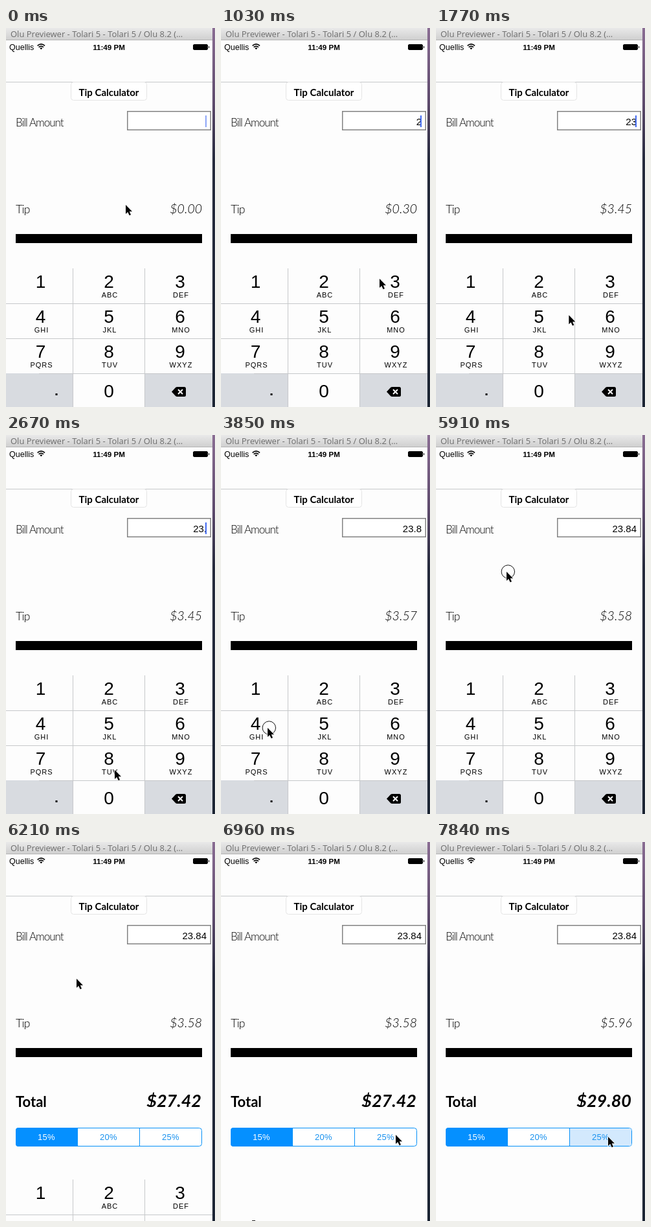
Write an HTML page that moves like this. It is 323 by 585 pixels and loops after 7990 ms.

```html
<!DOCTYPE html>
<html lang="en">
<head>
<meta charset="utf-8">
<title>Tip Calculator</title>
<style>
  html, body { margin: 0; width: 100%; height: 100%; overflow: hidden; background: #fdfdfd; }
  svg { display: block; }
  text { font-family: "Liberation Sans", Arial, sans-serif; }
  .hand { font-family: Lato, sans-serif; font-weight: 300; }
  .bold { font-weight: 700; }
  .end { text-anchor: end; }
  .mid { text-anchor: middle; }
  .line { stroke: #c6c8ca; }
</style>
</head>
<body>
<svg id="stage" width="323" height="585">
  <defs>
    <linearGradient id="bar" x2="0" y2="1">
      <stop stop-color="#e9e9e9"/><stop offset="1" stop-color="#d0d0d0"/>
    </linearGradient>
    <linearGradient id="desk" x2="0" y2="1">
      <stop stop-color="#8a6d93"/><stop offset=".2" stop-color="#5d4a6c"/>
      <stop offset=".35" stop-color="#252a3c"/><stop offset="1" stop-color="#1c2534"/>
    </linearGradient>
  </defs>

  <rect width="323" height="585" fill="#fdfdfd"/>
  <rect x="319" width="4" height="585" fill="url(#desk)"/>
  <rect width="319" height="18" fill="url(#bar)"/>
  <path d="M0 18.5H319" stroke="#b4b4b4"/>
  <text x="7" y="13.5" font-size="13" fill="#6c6c6c" style="font-family:'Open Sans',sans-serif">Olu Previewer - Tolari 5 - Tolari 5 / Olu 8.2 (…</text>

  <text x="5" y="34" font-size="12.5">Quellis</text>
  <g fill="none" stroke="#000" stroke-width="1.7">
    <path d="M48.6 27.3Q54.3 22.4 60 27.3M50.6 29.6Q54.3 26.5 58 29.6"/>
    <path d="M52.2 30.9L54.3 33.2 56.4 30.9Q54.3 29.5 52.2 30.9Z" fill="#000" stroke="none"/>
  </g>
  <text class="mid bold" x="159" y="33.5" font-size="11.6">11:49 PM</text>
  <rect x="289.5" y="25.5" width="22" height="8" rx="1.5" stroke="#000"/>
  <path d="M313 27.5Q315.5 29.5 313 31.5Z"/>

  <path class="line" d="M0 83.5H319"/>
  <rect x="100.5" y="83.5" width="117" height="28" rx="4" fill="#fff" stroke="#e4e4e4"/>
  <text class="hand bold mid" x="159" y="104.5" font-size="15">Tip Calculator</text>

  <text class="hand" x="15" y="152" font-size="17" letter-spacing="-1">Bill Amount</text>
  <rect x="187.75" y="128.75" width="128.5" height="28.5" fill="#fff" stroke="#828282" stroke-width="1.5"/>
  <text id="bill" class="end" x="310" y="150" font-size="15"></text>
  <rect id="caret" x="308" y="135" width="2" height="18" fill="#426bf2"/>

  <svg width="319" height="289">
    <text class="hand" x="15" y="286" font-size="18" letter-spacing="-1">Tip</text>
    <text id="tip" class="hand end" x="303" y="286" font-size="19.5" font-style="italic"></text>
  </svg>
  <rect x="15" y="318" width="288" height="14"/>
  <svg width="319" height="409">
    <text class="hand bold" x="15" y="409" font-size="22">Total</text>
    <text id="total" class="hand bold end" x="302" y="409" font-size="27" font-style="italic"></text>
  </svg>

  <g id="segments">
    <rect x="15.5" y="441.5" width="287" height="28" rx="4" fill="#fff" stroke="#0590f8"/>
    <path d="M111 441H19a4 4 0 0 0-4 4V466a4 4 0 0 0 4 4H111Z" fill="#0590ff"/>
    <path id="hot" d="M207 442H299a3 3 0 0 1 3 3V466a3 3 0 0 1-3 3H207Z" fill="#d3e9fd"/>
    <path d="M110.5 441V470M206.5 441V470" stroke="#0590f8"/>
  </g>

  <path id="rest" d="M48 584.5H53" stroke="#222"/>
  <g id="pad"></g>
  <circle id="ring" r="10.2" fill="none" stroke="#111"/>
  <path id="arrow" d="M0 0V14L3.2 11 5.6 16.2 8 15.2 5.7 10.2H10Z" stroke="#fff" stroke-width="1.2" paint-order="stroke"/>
</svg>
<script>
const $ = id => document.getElementById(id);
const NS = "http://www.w3.org/2000/svg";
const LOOP = 7990, STEP = 148;

function add(parent, tag, attrs, text = "") {
  const el = document.createElementNS(NS, tag);
  for (const name in attrs) el.setAttribute(name, attrs[name]);
  el.textContent = text;
  return parent.appendChild(el);
}

["15%", "20%", "25%"].forEach((label, i) => add($("segments"), "text", {
  class: "mid", x: 62.5 + 96 * i, y: 460, "font-size": 13, "letter-spacing": .3,
  fill: i ? "#1690ee" : "#fff"
}, label));

// Keypad: white keys turn grey when pressed, grey keys turn white.
const WHITE = "#fdfdfd", GREY = "#d8dbe0";
const left = [0, 104, 215], wide = [103, 110, 104], centre = [53.5, 159, 269];
const letters = ["", "ABC", "DEF", "GHI", "JKL", "MNO", "PQRS", "TUV", "WXYZ"];
const pad = $("pad"), keys = {};

add(pad, "rect", { y: 371, width: 319, height: 214, fill: WHITE });
function key(name, col, row, sub) {
  const y = 371 + 54 * row;
  keys[name] = add(pad, "rect", { x: left[col], y, width: wide[col], height: 54, fill: WHITE });
  add(pad, "text", { class: "mid", x: centre[col], y: y + (row < 3 ? 30 : 37), "font-size": 28 }, name);
  add(pad, "text", { class: "mid", x: centre[col] + 1.5, y: y + 45, "font-size": 11, "letter-spacing": 1 }, sub);
}
letters.forEach((sub, i) => key(String(i + 1), i % 3, Math.floor(i / 3), sub));
key("0", 1, 3, "");
for (const x of [0, 215]) add(pad, "rect", { x, y: 533, width: 104, height: 52, fill: GREY });
keys["."] = add(pad, "rect", { x: 51, y: 533, width: 52, height: 52, fill: GREY });
add(pad, "rect", { x: 76.5, y: 564, width: 3, height: 3 });
add(pad, "path", { d: "M256 561.5L262 555Q263 554 264.5 554H275.5Q278 554 278 556.5V566.5Q278 569 275.5 569H264.5Q263 569 262 568Z" });
add(pad, "path", { d: "M266 558L273 565M273 558L266 565", stroke: "#fff", "stroke-width": 2 });
add(pad, "path", { class: "line", d: "M0 425.5H319M0 479.5H319M51 533.5H319M103.5 371V585M214.5 371V585" });

// Each row starts with the step at which it takes effect.
const typed = [[0, ""], [5, "2"], [11, "23"], [17, "23."], [21, "23.8"], [28, "23.84"]];
const pressed = [[0, ""], [4, "2"], [6, ""], [10, "3"], [12, ""], [16, "."], [17, ""], [20, "8"], [22, ""], [27, "4"], [29, ""]];
const caret = [[0, .6], [1, 0], [4, 1], [8, 0], [10, 1], [14, 0], [16, 1], [23, 0], [27, 1], [31, 0], [34, 1], [37, 0]];
const rings = [[0, 0], [4, 1], [6, 0], [9, 1], [11, 0], [16, 1], [17, 0], [19, 1], [21, 0], [26, 1], [29, 0], [40, 1], [41, 0], [51, 1], [53, 0]];
const slide = [[0, 0], [41, 60], [42, 150], [43, 204], [44, 214]];
const path = [
  [0, 185, 273], [3, 165, 387], [5, 165, 389], [7, 245, 387], [8, 265, 387], [11, 267, 389],
  [14, 82, 552], [16, 76, 560], [18, 168, 517], [19, 164, 503], [21, 163, 502], [23, 89, 454],
  [24, 72, 452], [28, 72, 452], [33, 130, 515], [36, 122, 390], [39, 109, 211], [43, 109, 211],
  [45, 175, 330], [47, 270, 452], [49, 267, 455], [53, 266, 455]
];

const at = (rows, n) => rows.findLast(row => row[0] <= n)[1];

function pointer(n) {
  const i = path.findLastIndex(row => row[0] <= n);
  const [a, x, y] = path[i], [b, u, v] = path[i + 1] || [a + 1, x, y];
  const f = (n - a) / (b - a);
  return [x + (u - x) * f, y + (v - y) * f];
}

const show = (id, value) => $(id).setAttribute("opacity", Number(value));
const move = (id, x, y) => $(id).setAttribute("transform", `translate(${x} ${y})`);
const money = value => "$" + value.toFixed(2);

function draw(ms) {
  const n = Math.min(53, Math.floor((ms + 12) / STEP));
  const bill = at(typed, n), amount = parseFloat(bill) || 0;
  const tip = amount * (n < 53 ? .15 : .25), drop = at(slide, n);
  const [x, y] = pointer(n);

  $("bill").textContent = bill;
  $("tip").textContent = money(tip);
  $("total").textContent = money(amount + tip);
  for (const name in keys) {
    const down = name === at(pressed, n);
    keys[name].setAttribute("fill", down !== (name === ".") ? GREY : WHITE);
  }
  show("caret", at(caret, n));
  show("ring", at(rings, n));
  show("hot", n >= 52);
  show("rest", n >= 44 && n < 51);
  move("pad", 0, drop);
  move("arrow", x, y);
  move("ring", x + 2.3, y);
}

const start = performance.now();
function tick() {
  draw((performance.now() - start) % LOOP);
  requestAnimationFrame(tick);
}
tick();
</script>
</body>
</html>
```
